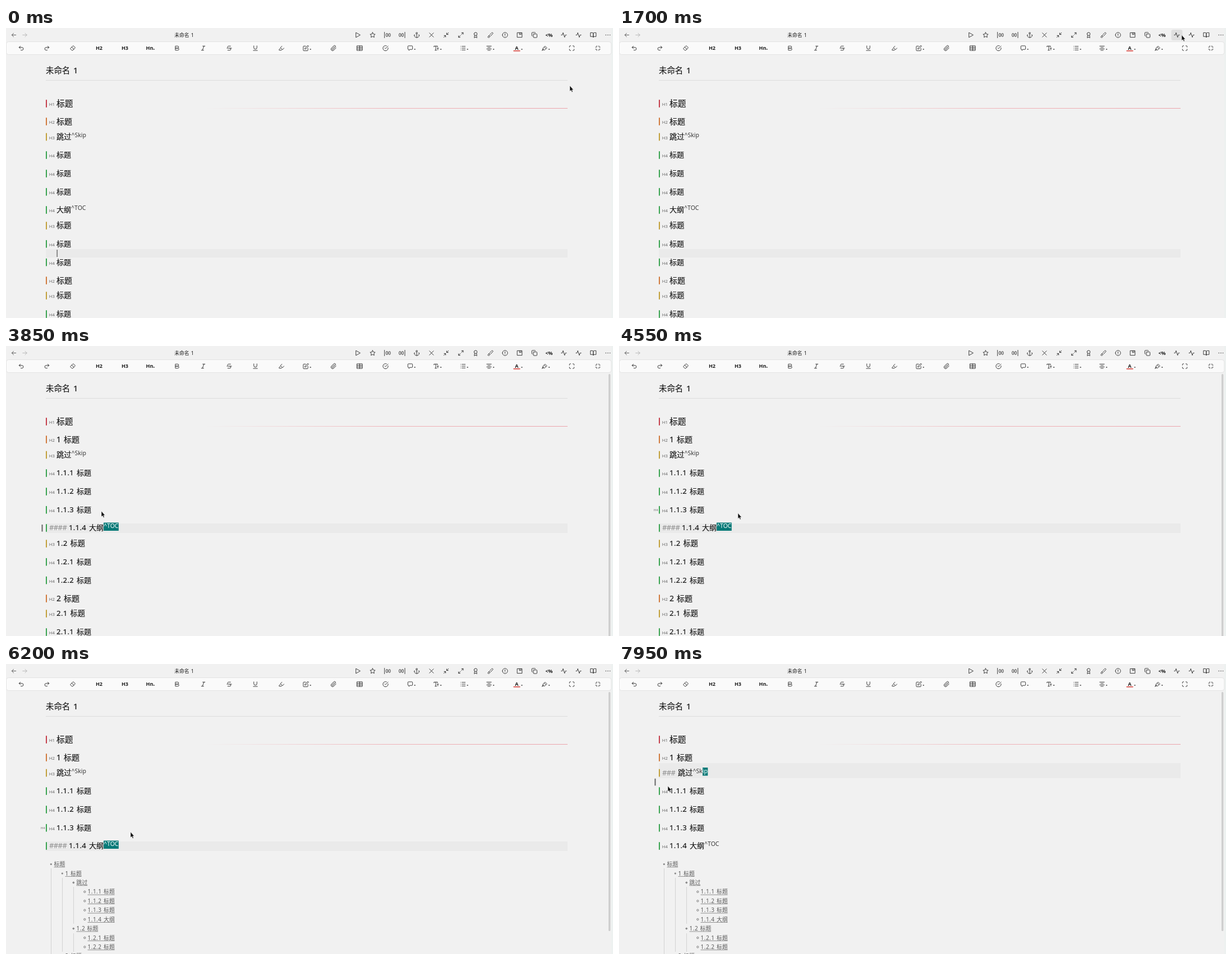
Animation, 1082 px wide and 518 px high, one loop 8000 ms. Source, as an HTML page:

```html
<!DOCTYPE html>
<html lang="zh">
<head>
<meta charset="utf-8">
<style>
html, body { margin: 0; width: 100%; height: 100%; overflow: hidden; background: #f1f1f1; }
svg { display: block; width: 100%; height: 100%; }
text { font-family: "Noto Sans", "Noto Sans CJK SC", "Noto Sans CJK", sans-serif; fill: #1b1b1b; white-space: pre; }
.h { font-weight: 500; stroke: #1b1b1b; stroke-width: .2; }
.icon { fill: none; stroke: #2c2c2c; stroke-width: 2; stroke-linecap: round; stroke-linejoin: round; }
</style>
</head>
<body>
<svg viewBox="0 0 1082 518">
  <defs>
    <linearGradient id="fade" gradientUnits="userSpaceOnUse" x1="355" y1="0" x2="1001" y2="0">
      <stop offset="0" stop-color="#f0b0b6" stop-opacity="0"/>
      <stop offset=".5" stop-color="#f0acb2" stop-opacity=".9"/>
      <stop offset="1" stop-color="#eba4ab"/>
    </linearGradient>
  </defs>
  <rect width="1082" height="518" fill="#f1f1f1"/>
  <rect x="1079" width="3" height="518" fill="#edf1f0"/>
  <rect id="hover" y="3" width="20" height="19" rx="3" fill="#dfdfdf"/>
  <g id="bars"></g>
  <g id="doc"></g>
  <path id="mouse" d="M0 0V10L2.2 8 3.800 11.500 5.300 10.800 3.900 7.500H6.600Z" fill="#111" stroke="#fff" stroke-width=".5"/>
</svg>
<script>
const LOOP = 8000;
const $ = id => document.getElementById(id);
const rect = (x, y, w, h, fill, extra = '') =>
  `<rect x="${x}" y="${y}" width="${w}" height="${h}" fill="${fill}" ${extra}/>`;
const text = (x, y, size, str, extra = '') =>
  `<text x="${x}" y="${y}" font-size="${size}" ${extra}>${str}</text>`;
const icon = (x, y, d, scale = .46, extra = '') =>
  `<path class="icon" d="${d}" transform="translate(${x} ${y}) scale(${scale}) translate(-12 -12)" ${extra}/>`;
const disc = (x, y, r) => `M${x - r} ${y}a${r} ${r} 0 1 0 ${2 * r} 0a${r} ${r} 0 1 0 ${-2 * r} 0`;

// Top row, evenly spaced
const pulse = 'M22 12h-4l-3 9L9 3l-3 9H2';
const ring = x => `M${x} 9a3.200 3.200 0 0 1 6.400 0v6a3.200 3.200 0 0 1-6.400 0z`;
const topIcons = [
  'M5 3l16 9-16 9z',
  'M12 2l3.1 6.3 6.9 1-5 4.8 1.2 6.9-6.2-3.2-6.2 3.2L7 14.1 2 9.3l6.9-1z',
  `M1 1v22${ring(7)}${ring(17)}`,
  `M23 1v22${ring(.6)}${ring(10.6)}`,
  'M12 22V8M5 12H2a10 10 0 0 0 20 0h-3' + disc(12, 5, 3),
  'M20 4L4 20M4 4l16 16',
  'M4 14h6v6M20 10h-6V4M14 10l7-7M3 21l7-7',
  'M15 3h6v6M9 21H3v-6M21 3l-7 7M3 21l7-7',
  disc(12, 8, 6) + 'M8.2 13.9L7 23l5-3 5 3-1.2-9.1',
  'M9 12l8-8a2.9 2.9 0 1 1 4 4l-8 8M7 15c-1.7 0-3 1.3-3 3 0 1.3-2.5 1.5-2 2 1 1 2.5 2 4 2 2.2 0 4-1.8 4-4a3 3 0 0 0-3-3z',
  disc(12, 12, 10) + 'M12 7v6M12 17h.01',
  'M3 3h18v18H3zM11 3v8l3-2 3 2V3',
  'M10 8h10a2 2 0 0 1 2 2v10a2 2 0 0 1-2 2H10a2 2 0 0 1-2-2V10a2 2 0 0 1 2-2zM4 16a2 2 0 0 1-2-2V4a2 2 0 0 1 2-2h10a2 2 0 0 1 2 2',
  '', pulse, pulse,
  'M2 3h6a4 4 0 0 1 4 4v14a3 3 0 0 0-3-3H2zM22 3h-6a4 4 0 0 0-4 4v14a3 3 0 0 1 3-3h7z',
  disc(4, 12, .7) + disc(12, 12, .7) + disc(20, 12, .7)
];
const topX = i => 627.3 + i * 26.22;

// centre x, path, has a menu
const tools = [
  [27, 'M9 14L4 9l5-5M4 9h11a5.5 5.5 0 0 1 0 11h-4'],
  [73, 'M15 14l5-5-5-5M20 9H9a5.5 5.5 0 0 0 0 11h4'],
  [119, 'M8 20l-4.3-4.3a2.4 2.4 0 0 1 0-3.4l8.6-8.6a2.4 2.4 0 0 1 3.4 0l4.6 4.6a2.4 2.4 0 0 1 0 3.4L12.500 20zM8 8l8 8'],
  [305, 'M6 4h8a4 4 0 0 1 0 8H6zM6 12h9a4 4 0 0 1 0 8H6z'],
  [351.5, 'M19 4h-9M14 20H5M15 4L9 20'],
  [398, 'M17 4H9a3.5 3.5 0 0 0-3 5.5M14 12a4 4 0 0 1 0 8H6M3 12h18'],
  [444.5, 'M6 3v7a6 6 0 0 0 12 0V3M4 21h16'],
  [491, 'M9 11l-6 6v3h9l3-3M22 12l-4.6 4.6a2 2 0 0 1-2.8 0l-5.2-5.2a2 2 0 0 1 0-2.8L14 4'],
  [534.5, 'M11 4H4a2 2 0 0 0-2 2v14a2 2 0 0 0 2 2h14a2 2 0 0 0 2-2v-7M18.5 2.5a2.1 2.1 0 0 1 3 3L12 15l-4 1 1-4z', 1],
  [584, 'M21.4 11.1l-9.2 9.1a6 6 0 0 1-8.5-8.5l9.2-9.1a4 4 0 0 1 5.7 5.6l-9.2 9.2a2 2 0 0 1-2.8-2.8l8.5-8.5'],
  [630.5, 'M2 3h20v18H2zM2 9h20M2 15h20M12 3v18'],
  [676.5, 'M22 11v1a10 10 0 1 1-6-9M22 4L12 14l-3-3'],
  [720.5, 'M21 15a2 2 0 0 1-2 2H11l-4 4v-4H5a2 2 0 0 1-2-2V5a2 2 0 0 1 2-2h14a2 2 0 0 1 2 2z', 1],
  [767, 'M3 7V4h14v3M10 4v16M7 20h6M15 12h6M18 12v7', 1],
  [814.5, 'M8 5h13M8 12h13M8 19h13M3 5h.01M3 12h.01M3 19h.01', 1],
  [861, 'M3 4h18M7 9.5h10M3 15h18M7 20.5h10', 1],
  [960, 'M3 21l3-9 8-8 7 7-8 8h-6M11 8l6 6M3 21l6-6', 1],
  [1008.5, 'M8 3H5a2 2 0 0 0-2 2v3M21 8V5a2 2 0 0 0-2-2h-3M3 16v3a2 2 0 0 0 2 2h3M16 21h3a2 2 0 0 0 2-2v-3'],
  [1055, 'M8 3v3a2 2 0 0 1-2 2H3M21 8h-3a2 2 0 0 1-2-2V3M3 16h3a2 2 0 0 1 2 2v3M16 21v-3a2 2 0 0 1 2-2h3']
];
const menuDot = x => rect(x, 37.2, 2, 1.6, '#444');
const bold = 'font-weight="600"';
const label = (x, str) => text(x, 39.3, 9, str, bold + ' text-anchor="middle"');

$('bars').innerHTML =
  icon(14, 12.5, 'M20 12H4M11 19l-7-7 7-7', .46, 'style="stroke:#555"') +
  icon(33.5, 12.5, 'M4 12h16M13 5l7 7-7 7', .46, 'style="stroke:#b4b4b4"') +
  text(300.2, 15.8, 8.8, '未命名') + text(329.8, 15.8, 8.8, '1') +
  topIcons.map((d, i) => icon(topX(i), 12.5, d)).join('') +
  text(968, 15.8, 8.8, '&lt;%', bold + ' text-anchor="middle"') +
  rect(.5, 24.5, 1078.5, 23, '#fafafa', 'rx="4" stroke="#e3e3e3"') +
  tools.map(([x, d, menu]) => icon(x, 36, d) + (menu ? menuDot(x + 7.2) : '')).join('') +
  label(166, 'H2') + label(212, 'H3') + label(256, 'Hn') + menuDot(262.7) +
  label(910.3, 'A') + rect(904.5, 40, 12, 1.6, '#d8453e') + menuDot(918.5) +
  text(71, 81.4, 14.4, '未命名', 'class="h"') + text(120, 81.4, 14.4, '1', 'class="h"') +
  rect(71, 93, 930, 1, '#dcdcdc') + rect(345, 143, 656, 1, 'url(#fade)');

const colors = ['', '#c23542', '#cf7332', '#bf9c30', '#2f9f48'];
const sizes = ['', 14.7, 14, 13.2, 13];
// level, centre y, number, word, superscript
const headings = [
  [1, 135, '', '标题'], [2, 167, '1', '标题'], [3, 194.5, '', '跳过', '^Skip'],
  [4, 227, '1.1.1', '标题'], [4, 260, '1.1.2', '标题'], [4, 292.7, '1.1.3', '标题'],
  [4, 325, '1.1.4', '大纲', '^TOC'], [3, 353, '1.2', '标题'], [4, 385.7, '1.2.1', '标题'],
  [4, 418.5, '1.2.2', '标题'], [2, 451, '2', '标题'], [3, 478, '2.1', '标题'], [4, 511, '2.1.1', '标题']
];

function heading([level, y, num, word, sup], numbered, active, picked) {
  const size = sizes[level], base = y - .4 + size * .37;
  let x = 90, out = rect(71, y - 6.8, 1.9, 13.6, colors[level]);
  if (active) {
    out += text(77, base, 13, '#'.repeat(level), 'style="fill:#8c8c8c" letter-spacing="-.6"');
    x = level === 4 ? 112 : 105;
  } else out += text(76.8, y + 4.4, 7.7, 'H' + level, 'style="fill:#666"');
  if (numbered && num) {
    out += text(x, base, size, num, 'class="h" letter-spacing=".35"');
    x += 13 + 5.75 * (num.length - 1);
  }
  out += text(x, base, size, word, 'class="h"');
  if (sup) {
    const sx = x + size * 2;
    const from = sup.length - picked;
    const left = picked === 2 ? sx + 17.6 : sx;
    if (picked) out += rect(left, y - 9.5, picked === 2 ? 9.3 : 26.8, 14.5, '#067a78');
    out += `<text x="${sx}" y="${y + .4}" font-size="10.5" style="fill:#3a3a3a">${sup.slice(0, from)}` +
      `<tspan fill="#fff">${sup.slice(from)}</tspan></text>`;
  }
  return out;
}

// depth, number, word
const outline = [
  [0, '', '标题'], [1, '1', '标题'], [2, '', '跳过'], [3, '1.1.1', '标题'], [3, '1.1.2', '标题'],
  [3, '1.1.3', '标题'], [3, '1.1.4', '大纲'], [2, '1.2', '标题'], [3, '1.2.1', '标题'],
  [3, '1.2.2', '标题'], [1, '2', '标题']
];
const gray = 'style="fill:#5c5c5c"';
const toc = [[80, 365, 518], [100, 382, 514], [120, 398, 464], [120, 481, 514]]
  .map(([x, a, b]) => rect(x, a, 1, b - a, '#d2d2d2')).join('') +
  outline.map(([depth, num, word], i) => {
    const x = 85.5 + depth * 20, y = 357.6 + i * 16.43;
    const shift = num ? 9.5 + 4.75 * (num.length - 1) : 0, bx = x - 5.2;
    const bullet = depth === 3 ? `<circle cx="${bx}" cy="${y}" r="1.6" fill="none" stroke="#777"/>`
      : depth === 2 ? `<path d="M${bx} ${y - 2.2}l2.2 2.2-2.2 2.2-2.2-2.2z" fill="#888"/>`
      : `<circle cx="${bx}" cy="${y}" r="1.6" fill="#888"/>`;
    return bullet + text(x, y + 3.5, 10, num, gray + ' letter-spacing=".5"') +
      text(x + shift, y + 3.5, 9.9, word, gray) + rect(x, y + 4.9, shift + 19.6, .8, '#777');
  }).join('');

// time, x, y of the pointer tip
const path = [
  [0, 1005, 103], [50, 1005, 103], [850, 1001, 15], [1700, 1003, 12.5], [2250, 1003, 12.5],
  [2650, 146, 315], [3050, 178, 320], [3400, 184, 320], [3850, 170, 295], [4750, 218, 299],
  [5400, 222, 300], [6250, 222, 300], [7050, 133, 193], [7150, 133, 193], [7400, 218, 195],
  [7700, 150, 191], [7950, 87, 218], [8000, 86, 220]
];
function pointer(t) {
  const i = path.findIndex(p => p[0] > t);
  const [t0, x0, y0] = path[i - 1], [t1, x1, y1] = path[i];
  const u = (t - t0) / (t1 - t0), e = u * u * (3 - 2 * u);
  return [x0 + (x1 - x0) * e, y0 + (y1 - y0) * e];
}

// time, marker label ('|' is a plain bar), y
const markers = [
  [0, ''], [2550, '|', 325], [3900, 'H4', 292.7], [6500, 'H4', 260],
  [6700, 'H4', 227], [6880, 'H3', 194.5], [7900, '|', 210.7]
];
const last = (list, t) => list.filter(m => m[0] <= t).pop();

let shown = '';
function update(t) {
  const [x, y] = pointer(t);
  $('mouse').setAttribute('transform', `translate(${x} ${y})`);
  const hit = Math.round((x - topX(0)) / 26.22);
  const over = y < 23 && hit >= 0 && Math.abs(x - topX(hit)) < 10;
  $('hover').setAttribute('x', over ? topX(hit) - 10 : -50);

  const numbered = t >= 1750, listed = t >= 4800, scroll = t >= 2350;
  const active = t < 3150 ? -1 : t < 7500 ? 6 : 2;
  const picked = active === 6 ? (t >= 3300 ? 4 : 0) : t >= 7650 ? 2 : 0;
  const caret = t < 500 || (t >= 1000 && t < 1500);
  const [, mark, my] = last(markers, t);
  const key = [numbered, listed, active, picked, caret, scroll, mark, my].join();
  if (key === shown) return;
  shown = key;
  let out = active < 0 ? rect(71, 395, 930, 15, '#eaeaea')
    : active === 6 ? rect(71, 317, 930, 17, '#eaeaea') : rect(71, 177, 930, 27, '#eaeaea');
  if (caret) out += rect(90.6, 396, 1, 13, '#333');
  out += headings.slice(0, listed ? 7 : 13)
    .map((h, i) => heading(h, numbered, i === active, i === active ? picked : 0)).join('');
  if (listed) out += toc;
  if (mark === '|') out += rect(63.5, my - 6, 2, 12.5, '#666');
  else if (mark) out += text(61.8, my + 2.4, 5.8, mark, bold + ' style="fill:#999"');
  if (scroll) out += rect(1074, 50, 3.4, listed ? 427 : 480, '#cfcfcf', 'rx="1.5"');
  $('doc').innerHTML = out;
}

const start = performance.now();
function tick() {
  update((performance.now() - start) % LOOP);
  requestAnimationFrame(tick);
}
tick();
</script>
</body>
</html>
```
